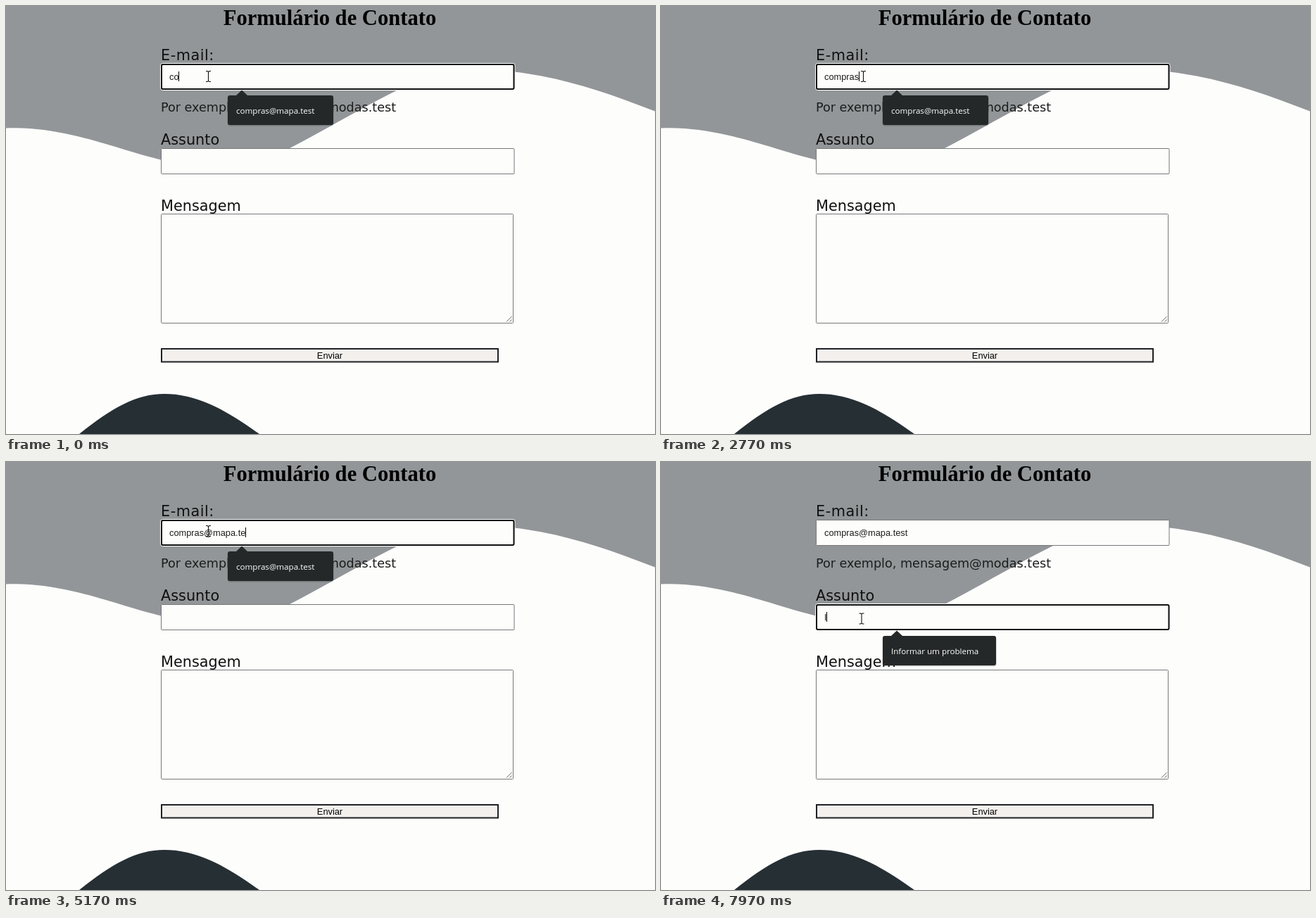
These frames come from a looping animation (922x608 px, 8 s). An HTML page:

```html
<!DOCTYPE html>
<html lang="pt-BR">
<head>
<meta charset="utf-8">
<title>Formulário de Contato</title>
<style>
  html, body { margin: 0; width: 100%; height: 100%; overflow: hidden; background: #fdfdfc; }
  svg { display: block; width: 922px; height: 608px; }
  text { fill: #111; white-space: pre; }
  .title { font: bold 30.6px "Liberation Serif", serif; text-anchor: middle; fill: #000; }
  .label { font: 20.8px "DejaVu Sans", sans-serif; }
  .hint { font: 17.6px "DejaVu Sans", sans-serif; fill: #1c1d1e; }
  .value { font: 12.8px "Liberation Sans", sans-serif; fill: #1c1c1c; }
  .send { text-anchor: middle; fill: #000; }
  .tip text { font: 11.6px "Open Sans", sans-serif; fill: #fff; }
  .tip path { fill: #252828; }
  .box { fill: #fdfdfc; stroke: #77787a; }
  .halo { fill: none; stroke: #fff; }
  .ring { fill: #fdfdfc; stroke: #101112; stroke-width: 2; }
</style>
</head>
<body>
<svg viewBox="0 0 922 608">
  <path fill="#929698" d="M0 0V173.500C60 170.500 120 189.500 154 199.500C180 207.500 200 213.500 220 218.500C290 238 345 232 405 201C455 175 510 142 557 119C620 88 680 87 722 93.500C790 101.500 850 121.500 922 149.500V0Z"/>
  <path fill="#262f33" d="M104 608C150 571 185 551 225 551C270 551 310 572 360 608Z"/>

  <text class="title" x="460" y="27">Formulário de Contato</text>
  <text class="label" x="220" y="77" letter-spacing=".5">E-mail:</text>
  <text class="hint" x="220" y="150">Por exemplo, mensagem@modas.test</text>
  <text class="label" x="220" y="197">Assunto</text>
  <text class="label" x="220" y="291">Mensagem</text>

  <g id="fields"></g>
  <rect class="box" x="220.500" y="295.500" width="500" height="155" rx="1"/>
  <path d="M711 448.500L718.500 441M715.500 448.500L718.500 445.500" stroke="#66666a" fill="none"/>
  <rect x="221" y="487" width="478" height="18.500" fill="#f3f0ee" stroke="#202124" stroke-width="2"/>
  <text class="value send" x="460" y="500.500">Enviar</text>

  <text class="value" id="email" x="232" y="104.500"></text>
  <text class="value" id="subject" x="232" y="224.500"></text>
  <path id="caret" d="M.5 0v14" stroke="#000"/>
  <g id="tips"></g>
  <path id="mouse" d="M-3.500 -7.500H-1.500L0 -6.500L1.500 -7.500H3.500M0 -6.500V6.500M-3.500 7.500H-1.500L0 6.500L1.500 7.500H3.500" fill="none" stroke="#111" stroke-width="1.100"/>
</svg>
<script>
const LOOP = 8000;
const ADDRESS = 'compras@mapa.test';
const KEYS = [-600, -300, 800, 1250, 1650, 2100, 2450, 3050, 3450, 3700, 3900, 4150, 4650, 4850, 5050, 5250, 5420];
const FOCUS_AT = 6250, SUBJECT_KEY = 7500;
const $ = id => document.getElementById(id);
const clamp = x => Math.min(1, Math.max(0, x));
const ramp = (t, from, to) => clamp((t - from) / (to - from));
const ease = x => x * x * (3 - 2 * x);

function addGroup(parent, markup) {
  const g = document.createElementNS('http://www.w3.org/2000/svg', 'g');
  g.innerHTML = markup;
  $(parent).append(g);
  return g;
}

// Returns the focus ring of the new field.
function addField(y) {
  return addGroup('fields', `
    <rect class="box" x="220.500" y="${y + .5}" width="501.500" height="36" rx="1"/>
    <g><rect class="halo" x="219.500" y="${y - .5}" width="503.500" height="38" rx="3"/>
    <rect class="ring" x="221" y="${y + 1}" width="500.500" height="35" rx="2"/></g>`).lastElementChild;
}

// Returns a function that sets how far the tip is shown, 0 to 1.
function addTip(y, width, label) {
  const right = 315 + width;
  const g = addGroup('tips', `
    <rect x="314.500" y="${y + .5}" width="${width + 1}" height="43" rx="4" fill="#000" opacity=".18"/>
    <path d="M318 ${y}H327L335 ${y - 7.5}L343 ${y}H${right - 3}q3 0 3 3v36q0 3 -3 3H318q-3 0 -3 -3v-36q0 -3 3 -3Z"/>
    <text x="327" y="${y + 26}">${label}</text>`);
  g.setAttribute('class', 'tip');
  const cx = 315 + width / 2, cy = y + 21;
  return shown => {
    const s = .933 + .067 * shown;
    g.setAttribute('opacity', shown);
    g.setAttribute('transform', `translate(${cx} ${cy}) scale(${s}) translate(${-cx} ${-cy})`);
  };
}

const emailRing = addField(82), subjectRing = addField(202);
const emailTip = addTip(127, 150, ADDRESS);
const subjectTip = addTip(247, 161, 'Informar um problema');

function draw(t) {
  const typed = KEYS.filter(k => k <= t).length;
  const onSubject = t >= FOCUS_AT;
  $('email').textContent = ADDRESS.slice(0, typed);
  $('subject').textContent = t >= SUBJECT_KEY ? 'I' : '';
  emailRing.style.display = onSubject ? 'none' : '';
  subjectRing.style.display = onSubject ? '' : 'none';

  const active = onSubject ? $('subject') : $('email');
  const last = t >= SUBJECT_KEY ? SUBJECT_KEY : onSubject ? FOCUS_AT : KEYS[typed - 1];
  const x = 232 + Math.floor(active.textContent ? active.getComputedTextLength() : 0);
  $('caret').setAttribute('transform', `translate(${x} ${onSubject ? 213 : 93})`);
  $('caret').style.display = (t - last) % 1060 < 530 ? '' : 'none';

  emailTip(1 - ramp(t, 5490, 5670));
  subjectTip(ramp(t, 7580, 7780));

  const nudge = ease(ramp(t, 2900, 3100));
  const move = ease(ramp(t, 5850, 6200));
  $('mouse').setAttribute('transform', `translate(${287.5 - 2.5 * move} ${100 - 2 * nudge + 124.5 * move})`);
}

const start = performance.now();
function tick() {
  draw((performance.now() - start) % LOOP);
  requestAnimationFrame(tick);
}
tick();
</script>
</body>
</html>
```
